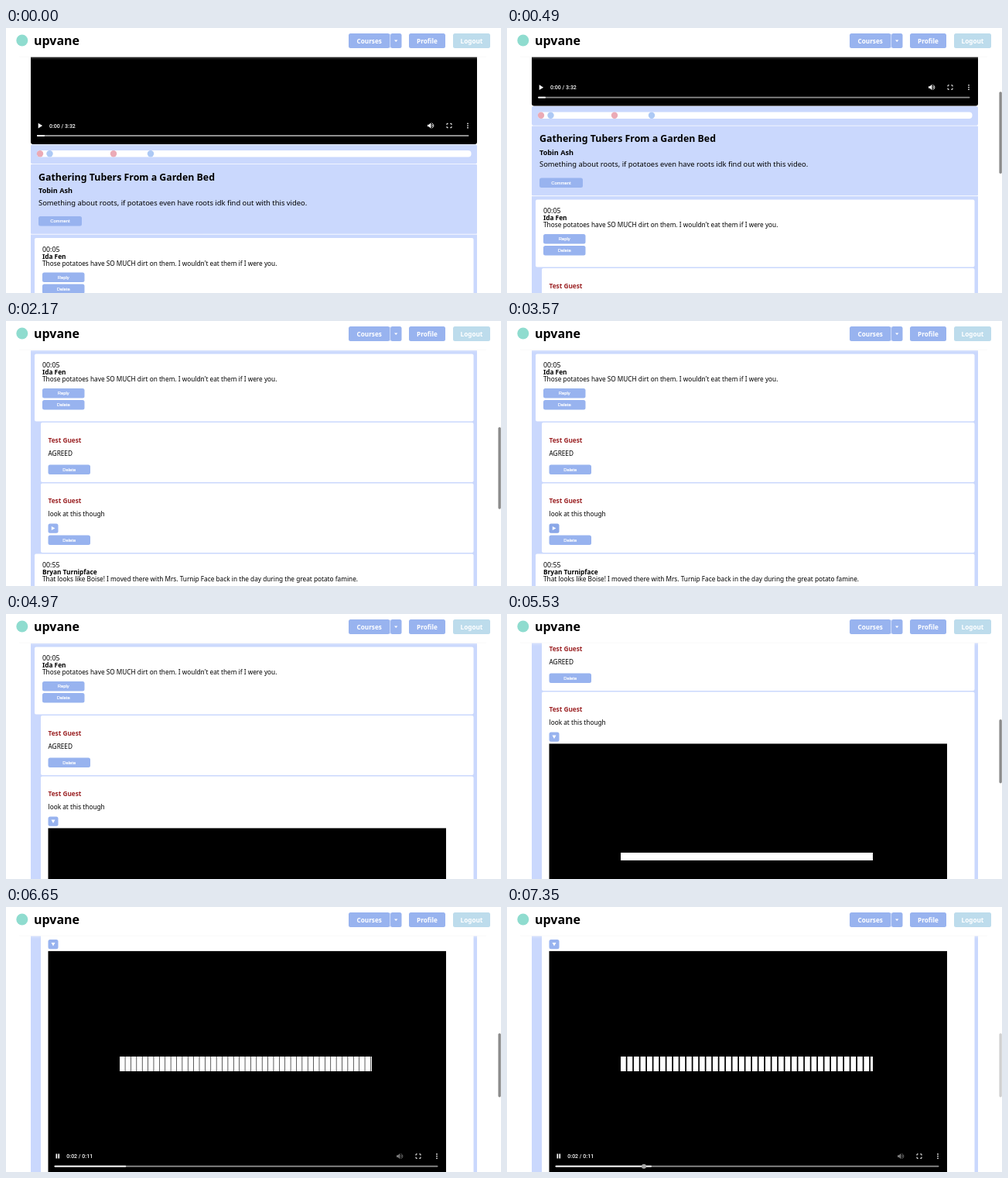
An HTML page that plays this animation: 640x342 px, repeating every 7420 ms.

```html
<!DOCTYPE html>
<html lang="en">
<head>
<meta charset="utf-8">
<title>Course video comments</title>
<style>
  html, body { margin: 0; width: 100%; height: 100%; overflow: hidden; background: #fff; }
  svg { display: block; width: 100vw; height: 100vh; }
  text { font-family: "Noto Sans", "Open Sans", sans-serif; font-size: 8.27px; white-space: pre; }
  .bold { font-weight: 700; }
  .brand { font-size: 16px; font-weight: 700; }
  .nav { font-size: 8.2px; font-weight: 800; fill: #fff; text-anchor: middle; }
  .title { font-size: 12.36px; font-weight: 700; }
  .author { font-size: 9.1px; font-weight: 700; }
  .about { font-size: 9.38px; }
  .stamp { font-size: 8.8px; }
  .guest { font-weight: 700; fill: #9c2426; }
  .small { font: 5.9px "Liberation Sans", Arial, sans-serif; fill: #fff; stroke: #fff; stroke-width: .2px; text-anchor: middle; }
  .clock { font: 500 7px Roboto, sans-serif; fill: #fff; }
</style>
</head>
<body>
<svg id="stage" viewBox="0 0 640 342"></svg>
<script>
const LOOP = 7420, STEP = 70;
const BLUE = '#cad8fd', BUTTON = '#98b3ef', RED_DOT = '#ebaab6', BLUE_DOT = '#adc9f5';
const OPEN_AT = 3990, PLAY_AT = 4550, VIDEO_H = 289.4;

// [time, scroll offset]
const SCROLL = [[0, 0], [1120, 150], [2170, 228.5], [5040, 228.5],
  [5530, 337.5], [5740, 346], [5880, 346], [6580, 448], [LOOP, 448]];
const BAR_FADE = [[0, 0], [70, 1], [2520, 1], [2730, 0], [5040, 0], [5110, 1], [7140, 1], [7350, .4], [LOOP, .4]];

const rect = (x, y, w, h, fill, r = 0, extra = '') =>
  `<rect x="${x}" y="${y}" width="${w}" height="${h}" fill="${fill}" rx="${r}" ${extra}/>`;
const text = (x, y, cls, str, extra = '') => `<text x="${x}" y="${y}" class="${cls}" ${extra}>${str}</text>`;
const circle = (x, y, r, fill, extra = '') => `<circle cx="${x}" cy="${y}" r="${r}" fill="${fill}" ${extra}/>`;
const path = (d, fill, extra = '') => `<path d="${d}" fill="${fill}" ${extra}/>`;

const navButton = (x, w, label, fill = BUTTON) =>
  rect(x, 7, w, 19, fill, 2.5) + text(x + w / 2, 19.5, 'nav', label);
const smallButton = (x, y, label, w = 54.5) =>
  rect(x, y, w, 12.5, BUTTON, 2.5) + text(x + w / 2, y + 8.2, 'small', label);
const card = (x, y, h, extra = '') => rect(x, y, 604.5 - x, h, '#fff', 2, extra);

function comment(y, stamp, name, body) {
  return text(47, y, 'stamp', stamp) + text(47, y + 9, 'bold', name) + text(47, y + 18.1, '', body);
}

function controls(left, right, y, track, dim) {
  const sx = right - 60, fx = right - 36, dx = right - 12;
  const corner = (a, b) => `M${fx + a * 3} ${y + b}v${b * 1.7}h${-a * 1.7}`;
  const tone = dim ? '#777' : '#fff';
  return path(`M${sx - 4} ${y - 1.3}h1.8l2.6 -2.4v7.4l-2.6 -2.4h-1.8z`, tone) +
    path(`M${sx + 1.6} ${y - 1.6}q1.5 1.6 0 3.2M${sx + 1.7} ${y - 3.3}q4.4 3.3 0 6.6`, 'none', `stroke="${tone}" stroke-width=".9"`) +
    path([[-1, -1], [1, -1], [-1, 1], [1, 1]].map(c => corner(...c)).join(''), 'none', 'stroke="#fff" stroke-width="1"') +
    [-2.7, 0, 2.7].map(d => circle(dx, y + d, .85, '#fff')).join('') +
    rect(left + 8, y + 12.1, right - left - 18.5, 1.8, track, .9);
}

function build() {
  const top = rect(32, -150, 577, 300, '#000', 3) +
    path('M41.7 122.8v6.6l5.4 -3.3z', '#fff') + text(56, 128.6, 'clock', '0:00 / 3:32') +
    controls(32, 609, 126, '#8e8e8e') + rect(40, 138.1, 10, 1.8, '#fff', .9) +
    rect(32, 150.5, 577, 24.7, BLUE, 2) + rect(40, 158, 561.5, 8.5, '#fff', 4) +
    [[44, RED_DOT], [56.5, BLUE_DOT], [139, RED_DOT], [187, BLUE_DOT]]
      .map(([x, c]) => circle(x, 162.2, 4.2, c)).join('');

  const info = rect(32, 176, 577, 89.8, BLUE, 1) +
    text(42, 196.8, 'title', 'Gathering Tubers From a Garden Bed') +
    text(42, 213.2, 'author', 'Tobin Ash') +
    text(42, 228.5, 'about', 'Something about roots, if potatoes even have roots idk find out with this video.') +
    smallButton(42, 243, 'Comment', 56);

  const thread = rect(32, 266.6, 577, 900, BLUE) +
    card(37, 271, 87) +
    comment(288.5, '00:05', 'Ida Fen', "Those potatoes have SO MUCH dirt on them. I wouldn't eat them if I were you.") +
    smallButton(47, 315.5, 'Reply') + smallButton(47, 330.5, 'Delete') +
    card(45, 359.5, 77) + text(54.5, 385, 'guest', 'Test Guest') +
    text(54.5, 402, '', 'AGREED') + smallButton(54.5, 414, 'Delete') +
    card(45, 438, 89.5, 'id="reply"') + text(54.5, 463.6, 'guest', 'Test Guest') +
    text(54.5, 480.6, '', 'look at this though') +
    rect(54.5, 490, 13, 12.3, BUTTON, 2.5, 'id="toggle"') + path('', '#fff', 'id="arrow"');

  const clip = '<g id="clip">' + rect(54.5, 504.9, 514.5, VIDEO_H, '#000') +
    path('', '#fff', 'id="strips"') +
    rect(64.5, 766.5, 1.7, 6, '#fff') + rect(67.4, 766.5, 1.7, 6, '#fff') +
    text(78.3, 772.1, 'clock', '', 'id="clock"') +
    controls(54.5, 569, 769.6, '#939393', true) +
    rect(62.5, 781.7, 0, 1.8, '#fff', .9, 'id="played"') +
    circle(177, 782.7, 3, '#a6a6a6', 'id="knob"') + '</g>';

  const tail = '<g id="tail">' + smallButton(54.5, 505, 'Delete') + card(37, 529, 90) +
    comment(546.5, '00:55', 'Bryan Turnipface',
      'That looks like Boise! I moved there with Mrs. Turnip Face back in the day during the great potato famine.') + '</g>';

  const header = rect(0, 0, 640, 37.4, '#fff') +
    rect(17, 36.8, 604, .6, '#f4f4f4') +
    rect(32, 37.4, 577, 2.8, '#fff', 0, 'opacity=".13"') +
    circle(20.8, 16, 7.5, '#8fdccf') + text(36, 22, 'brand', 'upvane') +
    navButton(443, 53.3, 'Courses') + rect(497, 7, 14.5, 19, BUTTON, 2.5) +
    rect(496.2, 7.4, .9, 18.2, '#c8d6f8') +
    path('M502 15.5h4.4l-2.2 2.6z', '#fff') +
    navButton(521, 47, 'Profile') + navButton(578, 48, 'Logout', '#bddcec');

  document.getElementById('stage').innerHTML =
    `<g id="page">${top}${info}${thread}${tail}${clip}</g>${header}` +
    rect(636.4, 0, 3.4, 100, '#8a8a8a', 1.7, 'id="bar"');
}

const clamp = (v, lo, hi) => Math.min(hi, Math.max(lo, v));

function segment(points, t) {
  let i = 0;
  while (i < points.length - 2 && t >= points[i + 1][0]) i++;
  return i;
}

function linear(points, t) {
  const i = segment(points, t), [t0, a] = points[i], [t1, b] = points[i + 1];
  return a + (b - a) * (t - t0) / (t1 - t0);
}

// Smooth monotone curve, at rest wherever a neighbouring stretch is flat.
function smooth(points, t) {
  const slope = k => (points[k + 1][1] - points[k][1]) / (points[k + 1][0] - points[k][0]);
  const tangent = k => {
    if (k === 0 || k === points.length - 1) return 0;
    const a = slope(k - 1), b = slope(k);
    return a * b > 0 ? 2 * a * b / (a + b) : 0;
  };
  const i = segment(points, t), [t0, a] = points[i], [t1, b] = points[i + 1];
  const d = t1 - t0, u = (t - t0) / d, v = 1 - u;
  return a * v * v * (1 + 2 * u) + b * u * u * (3 - 2 * u) +
    d * (tangent(i) * u * v * v - tangent(i + 1) * u * u * v);
}

// White band that grows in height, then splits into strips that drift apart.
function stripPath(t) {
  const strip = 6.75;
  const h = clamp((t - 4600) * .0107, 0, 19);
  const gap = Math.max(0, .63 + (t - 6650) * .0016);
  const y = 650.6 - h / 2;
  if (!gap) return `M147 ${y}h326v${h}h-326z`;
  let d = '';
  for (let x = 147; x < 473; x += strip + gap) {
    const w = Math.min(strip, 473 - x);
    d += `M${x} ${y}h${w}v${h}h${-w}z`;
  }
  return d;
}

build();
const el = {};
for (const node of document.querySelectorAll('[id]')) el[node.id] = node;
const set = (id, name, value) => el[id].setAttribute(name, value);

function draw(t) {
  const open = t >= OPEN_AT, playing = t >= PLAY_AT;
  const y = smooth(SCROLL, t);
  set('page', 'transform', `translate(0 ${-y})`);
  set('reply', 'height', open ? 89.5 + VIDEO_H + 2 : 89.5);
  set('tail', 'transform', `translate(0 ${open ? VIDEO_H + 2 : 0})`);
  set('toggle', 'fill', t >= 3570 && !open ? '#8aa7e8' : BUTTON);
  set('arrow', 'd', open ? 'M58.5 494h5l-2.5 4.6z' : 'M58.8 493.4v5.2l4.6 -2.6z');

  set('clip', 'visibility', playing ? 'visible' : 'hidden');
  if (playing) {
    const sec = Math.max(0, t - 4600) / 1000;
    set('strips', 'd', stripPath(t));
    set('played', 'width', 498 * sec / 11);
    set('knob', 'opacity', clamp((t - 7070) / 210, 0, 1));
    el.clock.textContent = `0:0${Math.floor(sec)} / 0:11`;
  }

  set('bar', 'y', open ? 53.6 + y * .244 : 67 + y * .306);
  set('bar', 'height', open ? 82.5 : 105.8);
  set('bar', 'opacity', linear(BAR_FADE, t));
}

const start = performance.now();
function tick() {
  const t = (performance.now() - start) % LOOP;
  draw(Math.floor(t / STEP) * STEP);
  requestAnimationFrame(tick);
}
tick();
</script>
</body>
</html>
```
